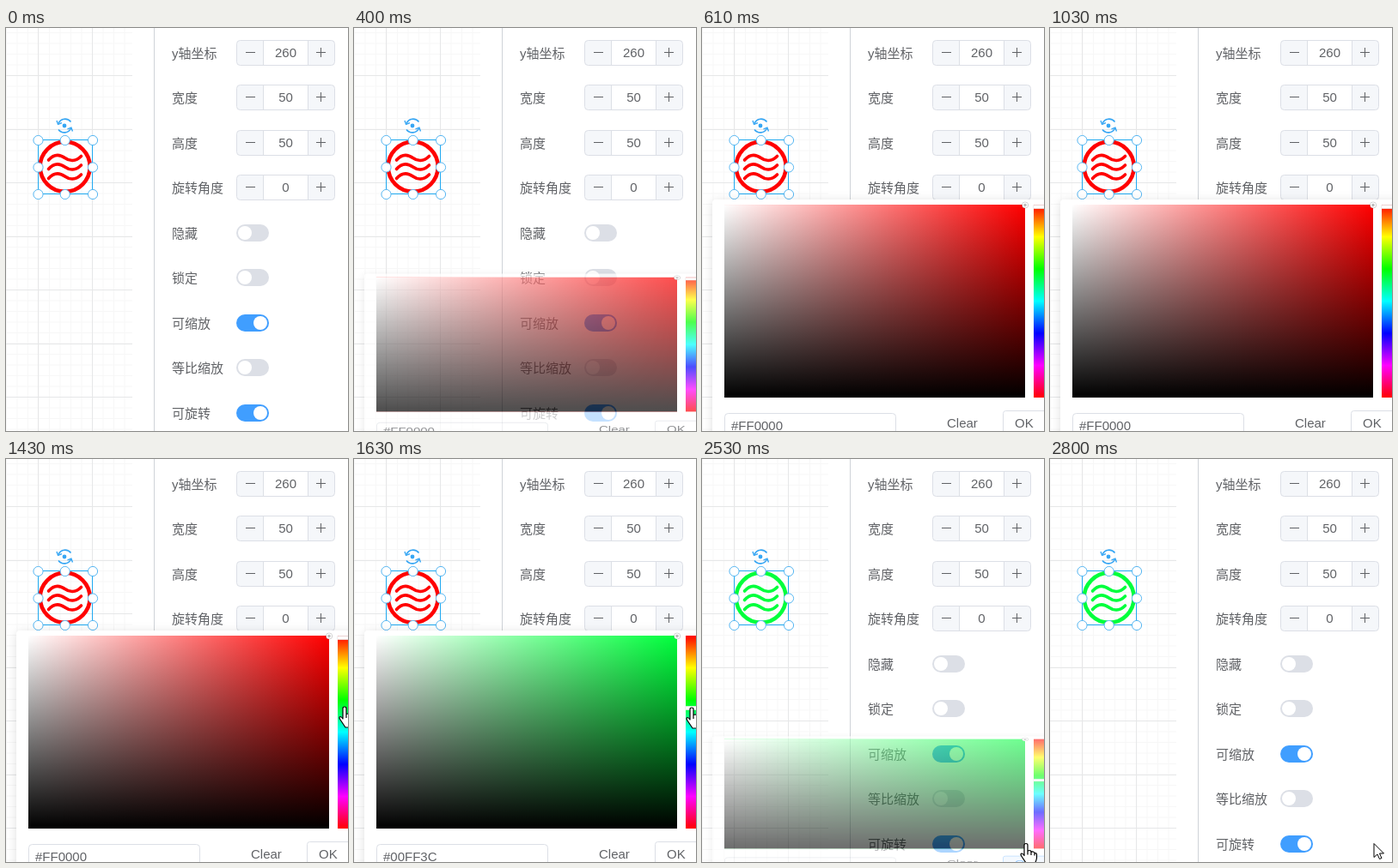
Write an HTML page that moves like this. It is 398 px wide and 470 px high and loops after 3330 ms.

```html
<!DOCTYPE html>
<html lang="zh-CN">
<head>
<meta charset="utf-8">
<title>Color picker</title>
<style>
html, body { margin: 0; width: 100%; height: 100%; overflow: hidden; background: #fff; }
svg { display: block; width: 398px; height: 470px; }
text { font: 15px "Liberation Sans", "Noto Sans CJK SC", "Noto Sans CJK", sans-serif; fill: #606266; }
#card { filter: drop-shadow(0 2px 6px rgba(0,0,0,.13)); }
</style>
</head>
<body>
<svg id="stage" viewBox="0 0 398 470">
  <defs>
    <linearGradient id="white"><stop stop-color="#fff"/><stop offset="1" stop-color="#fff" stop-opacity="0"/></linearGradient>
    <linearGradient id="black" x2="0" y2="1"><stop stop-opacity="0"/><stop offset="1"/></linearGradient>
    <linearGradient id="hues" x2="0" y2="1"></linearGradient>
  </defs>
  <rect width="398" height="470" fill="#fff"/>
  <g id="grid"></g>
  <path d="M172.5 0V470" stroke="#cfd3d8"/>
  <g id="form"></g>

  <g id="icon" fill="none" stroke-linecap="round">
    <circle cx="68.7" cy="161.8" r="29" stroke-width="4.6"/>
    <g id="waves" stroke-width="3.6"></g>
  </g>
  <rect x="37.5" y="130.5" width="63" height="63" fill="none" stroke="#1fa9f0"/>
  <g id="handles" fill="#fff" stroke="#58b7f2"></g>
  <g fill="none" stroke="#36a6f4" stroke-width="1.6">
    <path d="M61 111.5C63.5 105 71.5 104.5 75.5 109.5M75.5 117C73 123 65 123.500 61 118.500"/>
    <path d="M59 108l1.600 4.300 4.400-1.600M77.500 120.500l-1.600-4.300-4.400 1.600" stroke-width="1.400"/>
    <circle cx="68" cy="114" r="2.400" fill="#36a6f4" stroke="none"/>
  </g>

  <g id="popup">
    <rect id="card" x="12" y="200" width="420" height="290" rx="4" fill="#fff"/>
    <rect id="base" x="26" y="206" width="350" height="225"/>
    <rect x="26" y="206" width="350" height="225" fill="url(#white)"/>
    <rect x="26" y="206" width="350" height="225" fill="url(#black)"/>
    <circle cx="376" cy="206.500" r="3.800" fill="#999" fill-opacity=".7"/>
    <circle cx="376" cy="206.500" r="2.500" fill="#bbb" stroke="#fff" stroke-width="1.400"/>
    <rect x="386" y="206" width="13" height="225" fill="url(#hues)"/>
    <rect id="thumb" x="385.500" width="16" height="4" rx="1" fill="#fff" stroke="#e6e6e6" stroke-width=".8"/>
    <rect x="26.500" y="449.500" width="199" height="30" rx="4" fill="#fff" stroke="#dcdfe6"/>
    <text id="hex" x="34" y="469"></text>
    <text x="285" y="466">Clear</text>
    <rect id="okBox" x="350.500" y="446.500" width="52" height="27" rx="3"/>
    <text id="ok" x="364" y="466">OK</text>
  </g>

  <g id="cursor" fill="#fff" stroke="#000" stroke-linejoin="round">
    <path id="arrow" d="M0 0V16L4 12.500L6.500 18L9 17L6.500 11.500H11.500Z"/>
    <path id="hand" stroke-width="1.200" d="M-2 2Q-2 0 0 0Q2 0 2 2V9Q2 8 4 8Q6 8 6 10Q7 9 8.500 9.500Q10 10 10 11.500Q12 10.500 12.500 12.500V17Q12 20 10 24H1Q-1 21 -5 15Q-7 12 -5 11.500Q-3.500 11.500 -2 14ZM2 9V13M6 10V13.500M10 11.500V14"/>
  </g>
</svg>
<script>
const LOOP = 3330, STEP = 70, DURATION = 300;
const OPEN = 338, PICK = 1500, HOVER = 2180, APPLY = 2460, CLOSE = 2497;
const RED = '#FF0000', GREEN = '#00FF3C';
const $ = id => document.getElementById(id);
const set = (el, attrs) => { for (const k in attrs) el.setAttribute(k, attrs[k]); };
function add(parent, tag, attrs, label) {
  const el = document.createElementNS('http://www.w3.org/2000/svg', tag);
  set(el, attrs);
  if (label) el.textContent = label;
  $(parent).appendChild(el);
}

function buildGrid() {
  let minor = '', major = '';
  for (let x = 0; x < 147; x += 12.5) minor += `M${x + .5} 0V470`;
  for (let y = 5.5; y < 470; y += 12.5) minor += `M0 ${y}H147`;
  for (let y = 55.2; y < 470; y += 62.5) major += `M0 ${Math.round(y) + .5}H147`;
  add('grid', 'path', { d: minor, stroke: '#f7f7f7' });
  add('grid', 'path', { d: major + 'M37.5 0V470M100.5 0V470', stroke: '#e6e7e8' });
}

function numberField(y, value) {
  add('form', 'rect', { x: 268.5, y: y - 14.5, width: 114, height: 29, rx: 4, fill: '#f5f7fa', stroke: '#dcdfe6' });
  add('form', 'rect', { x: 299.5, y: y - 14.5, width: 52, height: 29, fill: '#fff', stroke: '#dcdfe6' });
  add('form', 'path', { d: `M279 ${y - .5}h11M361 ${y - .5}h11M366.5 ${y - 6}v11`, stroke: '#606266' });
  add('form', 'text', { x: 325.5, y: y + 5, 'text-anchor': 'middle' }, value);
}

function toggle(y, on) {
  add('form', 'rect', { x: 268, y: y - 10, width: 38, height: 20, rx: 10, fill: on ? '#409eff' : '#dcdfe6' });
  add('form', 'circle', { cx: on ? 296 : 278, cy: y, r: 8, fill: '#fff' });
}

function buildForm() {
  const rows = [['y轴坐标', 260], ['宽度', 50], ['高度', 50], ['旋转角度', 0],
    ['隐藏', false], ['锁定', false], ['可缩放', true], ['等比缩放', false], ['可旋转', true]];
  rows.forEach(([label, value], i) => {
    const y = Math.floor(29.45 + 52.45 * i);
    add('form', 'text', { x: 193, y: y + 6 }, label);
    if (typeof value === 'number') numberField(y, String(value));
    else toggle(y, value);
  });
}

function buildShape() {
  for (const y of [0, 10.5, 21.5])
    add('waves', 'path', { d: 'M49.5 154C56 146.500 63 147.500 68.500 151.500S81 156 87.500 149.500', transform: `translate(0 ${y})` });
  for (const x of [37.5, 68.7, 101])
    for (const y of [131, 162.5, 194])
      if (x !== 68.7 || y !== 162.5) add('handles', 'circle', { cx: x, cy: y, r: 5.6 });
  for (let i = 0; i <= 6; i++)
    add('hues', 'stop', { offset: i / 6, 'stop-color': `hsl(${i * 60 % 360},100%,50%)` });
}

// cubic-bezier(.23, 1, .32, 1)
function ease(x) {
  if (x <= 0) return 0;
  if (x >= 1) return 1;
  let lo = 0, hi = 1;
  for (let i = 0; i < 24; i++) {
    const u = (lo + hi) / 2, v = 1 - u;
    if (.69 * u * v * v + .96 * u * u * v + u * u * u < x) lo = u; else hi = u;
  }
  return 1 - (1 - lo) ** 3;
}

const tick = (t, from) => from + Math.floor((t - from) / STEP) * STEP;

function popupScale(t) {
  if (t < 400 || t >= 2800) return 0;
  if (t < APPLY) return ease((tick(t, 400) - OPEN) / DURATION);
  return 1 - ease((tick(t, APPLY) - CLOSE) / DURATION);
}

// start time, pointer, x, y
const moves = [
  [0], [890, 'arrow', 373, 285], [960, 'arrow', 386, 292], [1030],
  [1360, 'hand', 396, 284], [1430, 'hand', 394, 289], [1500, 'hand', 393, 290],
  [1760, 'hand', 396, 290], [1830],
  [1900, 'arrow', 395, 313], [1970, 'arrow', 389, 358], [2040, 'arrow', 382, 408],
  [2110, 'arrow', 377, 445], [2180, 'hand', 376, 447], [2250, 'hand', 377, 448.5],
  [2800, 'arrow', 377, 448.5]
];

function draw(t) {
  const s = popupScale(t), picked = t >= PICK, hover = t >= HOVER;
  const color = picked ? GREEN : RED;
  set($('icon'), { stroke: t >= APPLY ? GREEN : RED });
  set($('popup'), {
    transform: `translate(0 ${485 * (1 - s)}) scale(1 ${Math.max(s, .001)})`,
    opacity: s, visibility: s > 0 ? 'visible' : 'hidden'
  });
  set($('base'), { fill: color });
  set($('thumb'), { y: picked ? 288.5 : 206.5 });
  $('hex').textContent = color;
  set($('okBox'), { fill: hover ? '#ecf5ff' : '#fff', stroke: hover ? '#8cc5ff' : '#dcdfe6' });
  $('ok').style.fill = hover ? '#409eff' : '#606266';

  const [, kind, x = 0, y = 0] = moves.filter(m => m[0] <= t).pop();
  set($('cursor'), { transform: `translate(${x} ${y})` });
  for (const id of ['arrow', 'hand']) set($(id), { visibility: id === kind ? 'visible' : 'hidden' });
}

buildGrid();
buildForm();
buildShape();
const start = performance.now();
function loop(now) {
  draw(Math.max(0, now - start) % LOOP);
  requestAnimationFrame(loop);
}
draw(0);
requestAnimationFrame(loop);
</script>
</body>
</html>
```
